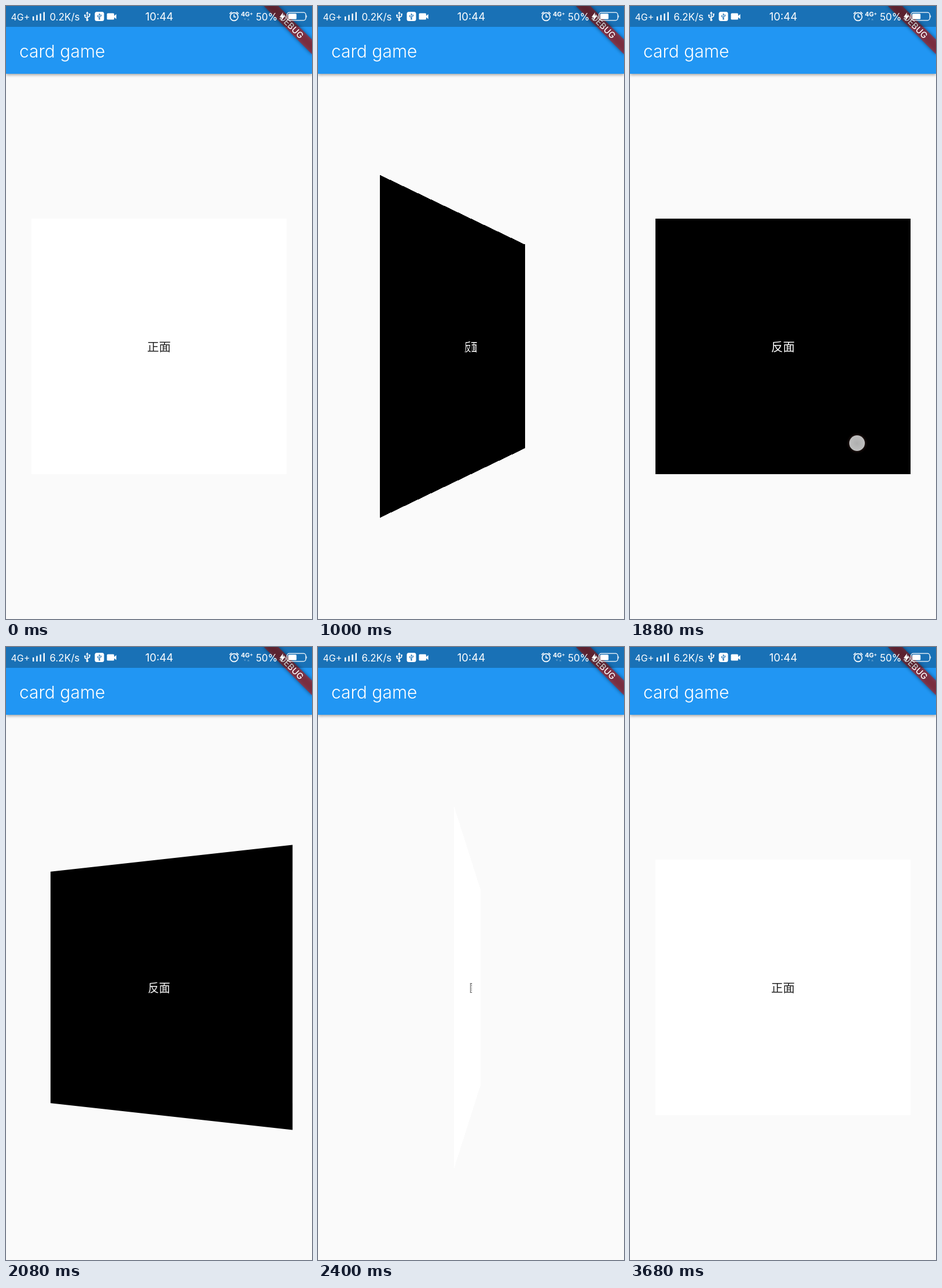
Write an HTML page that moves like this. It is 529x1058 px and loops after 3.8 s.

```html
<!DOCTYPE html>
<html lang="zh-CN">
<head>
<meta charset="utf-8">
<title>card game</title>
<style>
  html, body { margin: 0; width: 100%; height: 100%; overflow: hidden; background: #fafafa; }
  body { position: relative; }
  svg { position: absolute; left: 0; top: 0; font-family: Inter, Roboto, sans-serif; }
  .bar { position: absolute; left: 0; top: 0; width: 529px; height: 117px; background: #2196f3;
    box-shadow: 0 2px 5px rgba(0, 0, 0, .36); }
  .card { position: absolute; left: 44px; top: 367px; width: 441px; height: 441px;
    box-sizing: border-box; padding-bottom: 2px;
    display: flex; align-items: center; justify-content: center;
    font: 300 20.4px "Noto Sans CJK SC", "Noto Sans CJK", "Noto Sans CJK JP", sans-serif; }
  #front { background: #fff; color: #222; }
  #back { background: #000; color: #fff; }
  #touch { position: absolute; width: 27px; height: 27px; margin: -13.5px; border-radius: 50%;
    background: radial-gradient(#aeaeae, #c6c6c6); box-shadow: 0 0 4px 1px rgba(75, 48, 42, .65); }
</style>
</head>
<body>
<div class="bar"></div>
<div class="card" id="front">正面</div>
<div class="card" id="back">反面</div>
<div id="touch"></div>
<svg width="529" height="118" viewBox="0 0 529 118" fill="#fff">
  <defs>
    <filter id="blur" x="-20%" y="-60%" width="140%" height="220%"><feGaussianBlur stdDeviation="3"/></filter>
    <g id="usb" fill="none" stroke="currentColor" stroke-width="1.5">
      <path d="M0-6V6M0 3.5L-4 1V-2M0 2L4-.5V-3"/>
      <path d="M0-8.5L2.4-5H-2.4Z" fill="currentColor" stroke="none"/>
      <circle cy="6" r="2" fill="currentColor" stroke="none"/>
      <circle cx="-4" cy="-2" r="1.5" fill="currentColor" stroke="none"/>
      <path d="M2.7-5h2.6v2.6H2.7Z" fill="currentColor" stroke="none"/>
    </g>
  </defs>

  <text x="23" y="89" font-size="30" font-weight="300">card game</text>

  <g transform="translate(529 0) rotate(45)">
    <rect x="-58.8" y="41.1" width="117.6" height="17.7" opacity=".5" fill="#000" filter="url(#blur)"/>
    <rect x="-58.8" y="41.1" width="117.6" height="17.7" fill="#b71c1c" fill-opacity=".627"/>
    <text y="55.3" font-size="14.8" font-weight="500" text-anchor="middle">DEBUG</text>
  </g>
  <rect width="529" height="36" fill="#000" opacity=".25"/>

  <text x="8.5" y="25" font-size="16">4G+</text>
  <path d="M46 18h2.4v7H46ZM52.3 15.5h2.4V25h-2.4ZM58.4 13h2.4v12h-2.4ZM64.6 10.5h2.4V25h-2.4Z"/>
  <text id="speed" x="75.5" y="24.5" font-size="17"></text>
  <use href="#usb" x="140.5" y="18" color="#fff"/>
  <rect x="153.5" y="10" width="16" height="16" rx="3.5"/>
  <use href="#usb" transform="translate(161.5 18.3) scale(.66)" color="#1970b6"/>
  <rect x="174.5" y="12.5" width="12.5" height="11" rx="1.5"/>
  <path d="M187 17l3.7-3v8.5l-3.7-3Z"/>
  <text x="265" y="25" font-size="18.5" text-anchor="middle">10:44</text>

  <g fill="none" stroke="#fff" stroke-width="1.7">
    <circle cx="394.3" cy="18.5" r="6.8"/>
    <path d="M394.3 14.5v4.5h3.5M386.5 13.5l3.7-3.5M402.1 13.5l-3.7-3.5"/>
  </g>
  <text x="406" y="18" font-size="10.8" font-weight="700">4G<tspan dy="-2.5" font-size="8">+</tspan></text>
  <path d="M411 21.5h4l-2 3ZM417 24.5h4l-2-3Z" opacity=".3"/>
  <text x="432" y="24.5" font-size="17">50%</text>
  <path d="M479 11l-6 8h4l-1.5 7 7-9h-4.2Z"/>
  <rect x="485.7" y="11.2" width="32.6" height="13.6" rx="4" fill="none" stroke="#fff" stroke-width="1.3"/>
  <rect x="487.8" y="13.2" width="14.4" height="9.6" rx="1.5"/>
  <path d="M519.3 15.5q2 2.5 0 5Z"/>
</svg>
<script>
  const $ = id => document.getElementById(id);
  const LOOP = 3800, STEP = 40, FLIP = 1060;
  const flips = [877, 2379.5];  // moments when the card stands edge-on
  const taps = [                // from, to, x, y
    [400, 520, 392, 739],
    [1880, 2000, 392, 754],
    [3400, 3600, 432.5, 546]
  ];

  // Degrees from -90 to 90 around an edge-on moment
  const swing = dt => 90 * Math.sin(Math.PI * Math.max(-.5, Math.min(.5, dt / FLIP)));

  function draw(t) {
    const mid = flips[t < 1640 ? 0 : 1];
    const s = swing(t - mid);
    const angle = s < 0 ? -90 - s : 90 - s;
    const isBack = t >= flips[0] && t < flips[1];
    for (const id of ["front", "back"]) {
      const card = $(id);
      card.style.visibility = (id === "back") === isBack ? "visible" : "hidden";
      card.style.transform = Math.abs(angle) < .5 ? "none" : `perspective(735px) rotateY(${angle}deg)`;
    }

    const tap = taps.find(([from, to]) => t >= from && t < to);
    $("touch").style.display = tap ? "block" : "none";
    if (tap) {
      $("touch").style.left = tap[2] + "px";
      $("touch").style.top = tap[3] + "px";
    }
    $("speed").textContent = t < 1200 ? "0.2K/s" : "6.2K/s";
  }

  const start = performance.now();
  function tick() {
    const t = (performance.now() - start) % LOOP;
    draw(Math.floor(t / STEP) * STEP);
    requestAnimationFrame(tick);
  }
  tick();
</script>
</body>
</html>
```
